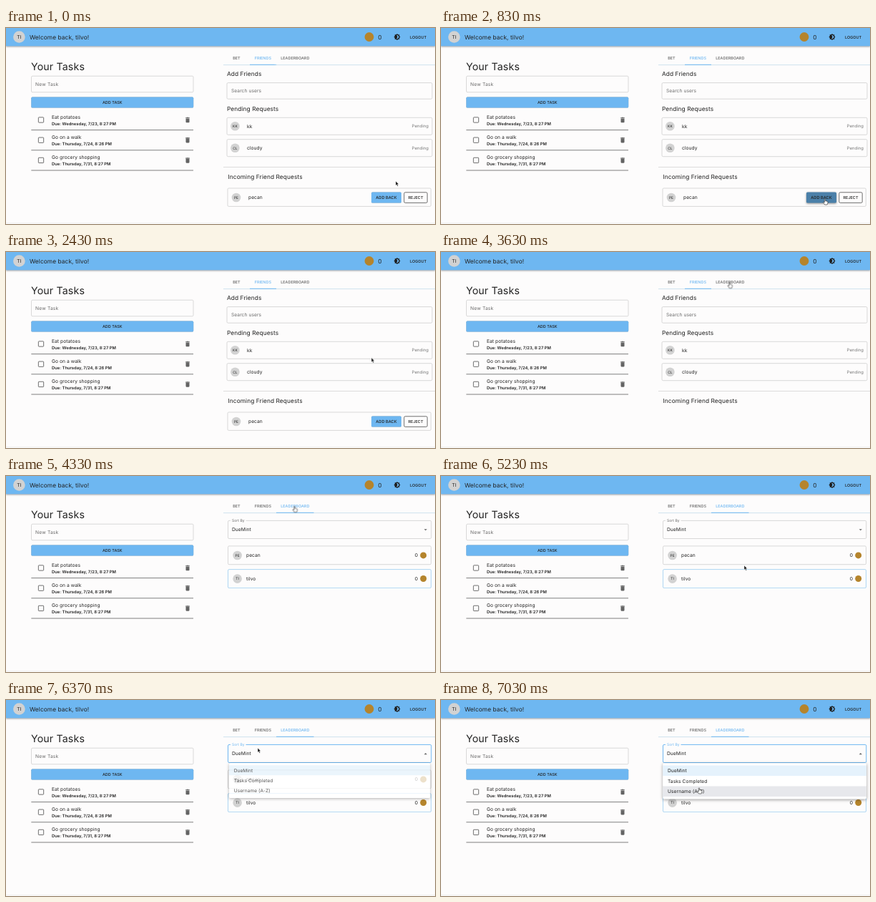
These frames come from a looping animation (600x274 px, 7070 ms). An HTML page:

```html
<!DOCTYPE html>
<html lang="en">
<head>
<meta charset="utf-8">
<title>Task dashboard</title>
<style>
:root { --blue: #6eb7f1; --ink: #222; --grey: #666; --loop: 7070ms; }
html, body { margin: 0; width: 100%; height: 100%; overflow: hidden; background: #fdfcfc; }
svg { display: block; width: 100%; height: 100%; }
text {
  font-family: Inter, "Open Sans", sans-serif; font-size: 6.67px; letter-spacing: .01em;
  fill: var(--ink); text-rendering: geometricPrecision;
}
.h4 { font-size: 14.2px; }
.h6 { font-size: 8.33px; }
.due { font-size: 5.83px; font-weight: 600; letter-spacing: 0; }
.caps { font-size: 5.5px; font-weight: 500; letter-spacing: 0; }
.mid { text-anchor: middle; }
.init { font-size: 4.9px; text-anchor: middle; letter-spacing: 0; }
.side { font-size: 5.95px; text-anchor: end; fill: #777; }
.hint { fill: #6a6a6a; }
.small { font-size: 5px; fill: var(--grey); }
.box { fill: none; stroke: #c9c9c9; stroke-width: .7; }
.rule { stroke: #4a4a4a; stroke-width: .7; }
.icon { fill: #636363; }
.avatar { fill: #d2d2d2; }
.coin { fill: #b5842c; }
.raised { fill: var(--blue); filter: drop-shadow(0 .8px .7px rgba(0,0,0,.35)); }

/* toggles and motion */
.flip, .press, .bar, .menu, .grow, .cursor { animation: var(--loop) infinite; }
.flip { animation-timing-function: step-end; }
.request { animation-name: request; }
.friends { animation-name: friends; }
.board { animation-name: board; }
.tab-a { animation-name: tabA; }
.tab-b { animation-name: tabB; }
.bar { fill: var(--blue); animation-name: bar; }
.press { animation-name: press; }
.frame { animation-name: frame; }
.label { animation-name: label; }
.closed { animation-name: closed; }
.opened { animation-name: opened; }
.menu { animation-name: fade; }
.grow { animation-name: grow; transform-origin: 452.5px 80px; }
.row1 { animation-name: row1; }
.row2 { animation-name: row2; }
.row3 { animation-name: row3; }
.cursor { animation-name: travel; }
.arrow { animation-name: arrow; }
.hand { animation-name: hand; }

@keyframes request { 0% { opacity: 1 } 38.2%, 100% { opacity: 0 } }
@keyframes friends { 0% { opacity: 1 } 54.2%, 100% { opacity: 0 } }
@keyframes board { 0% { opacity: 0 } 54.2%, 100% { opacity: 1 } }
@keyframes tabA { 0% { fill: var(--blue) } 54.2%, 100% { fill: var(--grey) } }
@keyframes tabB { 0% { fill: var(--grey) } 54.2%, 100% { fill: var(--blue) } }
@keyframes bar {
  0%, 54.2% { transform: translateX(341px) scaleX(37); animation-timing-function: cubic-bezier(.4,0,.2,1) }
  58.4%, 100% { transform: translateX(378px) scaleX(52.5) }
}
@keyframes press {
  0%, 6.3% { fill: var(--blue); filter: drop-shadow(0 .8px .7px rgba(0,0,0,.35)) }
  9.8%, 26% { fill: #4b80a9; filter: drop-shadow(0 1.2px 1.4px rgba(0,0,0,.45)) }
  29.5%, 100% { fill: var(--blue); filter: drop-shadow(0 .8px .7px rgba(0,0,0,.35)) }
}
@keyframes frame {
  0% { stroke: #c9c9c9; stroke-width: .7 }
  81.8% { stroke: #333; stroke-width: .7 }
  88.4%, 100% { stroke: var(--blue); stroke-width: 1 }
}
@keyframes label { 0% { fill: var(--grey) } 88.4%, 100% { fill: var(--blue) } }
@keyframes closed { 0% { opacity: 1 } 88.4%, 100% { opacity: 0 } }
@keyframes opened { 0% { opacity: 0 } 88.4%, 100% { opacity: 1 } }
@keyframes fade {
  0%, 88.4% { opacity: 0; animation-timing-function: cubic-bezier(.4,0,.2,1) }
  91.94%, 100% { opacity: 1 }
}
@keyframes grow {
  0%, 88.4% { transform: scale(.75, .5625); animation-timing-function: cubic-bezier(.4,0,.2,1) }
  90.76%, 100% { transform: none }
}
@keyframes row1 { 0% { fill: #e5f2fc } 94.4% { fill: #d6eafa } 95.7%, 100% { fill: #e5f2fc } }
@keyframes row2 { 0% { fill: #fff } 95.7% { fill: #e7e8ec } 97.9%, 100% { fill: #fff } }
@keyframes row3 { 0% { fill: #fff } 97.9%, 100% { fill: #e7e8ec } }
@keyframes travel {
  0%, 2% { transform: translate(545px, 214px); animation-timing-function: ease-in-out }
  9.6% { transform: translate(537px, 239px) }
  22.6% { transform: translate(537px, 239px); animation-timing-function: ease-in }
  34.4% { transform: translate(511px, 147.5px); animation-timing-function: ease-out }
  41.4% { transform: translate(412px, 48px); animation-timing-function: ease-out }
  48% { transform: translate(403.5px, 42.5px) }
  64% { transform: translate(403.5px, 42.5px); animation-timing-function: ease-in-out }
  73.9% { transform: translate(424px, 125px) }
  76% { transform: translate(424px, 125px); animation-timing-function: ease-in-out }
  86% { transform: translate(352px, 67px) }
  90.5% { transform: translate(352px, 67px); animation-timing-function: ease-in-out }
  99%, 100% { transform: translate(361px, 123px) }
}
@keyframes arrow {
  0% { opacity: 1 } 6.3% { opacity: 0 } 26% { opacity: 1 } 41% { opacity: 0 }
  65.9% { opacity: 1 } 81.8% { opacity: 0 } 88.4% { opacity: 1 } 94.4%, 100% { opacity: 0 }
}
@keyframes hand {
  0% { opacity: 0 } 6.3% { opacity: 1 } 26% { opacity: 0 } 41% { opacity: 1 }
  65.9% { opacity: 0 } 81.8% { opacity: 1 } 88.4% { opacity: 0 } 94.4%, 100% { opacity: 1 }
}
</style>
</head>
<body>
<svg viewBox="0 0 600 274" preserveAspectRatio="none">
  <defs>
    <circle id="face" class="avatar" r="6.3"/>
    <rect id="check" x="-3.65" y="-3.65" width="7.3" height="7.3" rx=".7" fill="none" stroke="#606060" stroke-width=".9"/>
    <path id="bin" class="icon" transform="scale(.417) translate(-12 -12)"
      d="M6 19c0 1.1.9 2 2 2h8c1.1 0 2-.9 2-2V7H6v12zM19 4h-3.5l-1-1h-5l-1 1H5v2h14V4z"/>
  </defs>

  <rect width="600" height="274" fill="#fdfcfc"/>
  <path d="M0 272.7H600" stroke="#ececec" stroke-width=".8"/>

  <!-- header -->
  <rect y="-4" width="600" height="29.3" fill="var(--blue)" style="filter:drop-shadow(0 1px 1.3px rgba(0,0,0,.35))"/>
  <circle class="avatar" cx="18.4" cy="12.5" r="8.3"/>
  <text class="mid" x="18.4" y="14.9">TI</text>
  <text class="h6" x="33" y="15.5">Welcome back, tilvo!</text>
  <circle class="coin" cx="508" cy="12.5" r="6.4"/>
  <text class="h6" x="520.3" y="15.6">0</text>
  <path fill="#1d1d1d" transform="translate(547 12.5) scale(.4) translate(-12 -12)"
    d="M20 8.69V4h-4.69L12 .69 8.69 4H4v4.69L.69 12 4 15.31V20h4.69L12 23.31 15.31 20H20v-4.69L23.31 12 20 8.69zM12 18c-.89 0-1.74-.2-2.5-.55C11.56 16.5 13 14.42 13 12s-1.44-4.5-3.5-5.45C10.26 6.2 11.11 6 12 6c3.31 0 6 2.69 6 6s-2.69 6-6 6z"/>
  <text class="caps" x="565" y="14.6">LOGOUT</text>

  <!-- tasks -->
  <text class="h4" x="35" y="58.7">Your Tasks</text>
  <rect class="box" x="35.5" y="67.2" width="226.5" height="22.6" rx="1.6"/>
  <text class="hint" x="41" y="80.8" style="letter-spacing:.03em">New Task</text>
  <rect class="raised" x="35.3" y="96.6" width="226.9" height="15" rx="1.6"/>
  <text class="caps mid" x="148.8" y="106.1">ADD TASK</text>
  <g>
    <use href="#check" x="49" y="128.5"/><use href="#bin" x="254" y="128.5"/>
    <text x="64" y="127.1">Eat potatoes</text>
    <text class="due" x="64" y="135.6">Due: Wednesday, 7/23, 8:27 PM</text>
    <path class="rule" d="M35.3 142.6H262"/>
  </g>
  <g transform="translate(0 28.2)">
    <use href="#check" x="49" y="128.5"/><use href="#bin" x="254" y="128.5"/>
    <text x="64" y="127.1">Go on a walk</text>
    <text class="due" x="64" y="135.6">Due: Thursday, 7/24, 8:26 PM</text>
    <path class="rule" d="M35.3 142.6H262"/>
  </g>
  <g transform="translate(0 56.4)">
    <use href="#check" x="49" y="128.5"/><use href="#bin" x="254" y="128.5"/>
    <text x="64" y="127.1">Go grocery shopping</text>
    <text class="due" x="64" y="135.6">Due: Thursday, 7/31, 8:27 PM</text>
    <path class="rule" d="M35.3 142.6H262"/>
  </g>

  <!-- tabs -->
  <path d="M304 51.6H600" stroke="#bcd8ea" stroke-width=".7"/>
  <text class="caps mid" x="322.4" y="43.8" style="fill:var(--grey)">BET</text>
  <text class="caps mid flip tab-a" x="359.4" y="43.8">FRIENDS</text>
  <text class="caps mid flip tab-b" x="404.3" y="43.8">LEADERBOARD</text>
  <rect class="bar" y="50.8" width="1" height="1"/>

  <!-- friends -->
  <g class="flip friends">
    <text class="h6" x="309" y="66.5">Add Friends</text>
    <rect class="box" x="309" y="76.6" width="287" height="22.6" rx="1.6"/>
    <text class="hint" x="315" y="90.2">Search users</text>
    <text class="h6" x="309" y="115.6">Pending Requests</text>
    <rect class="box" x="309" y="125.3" width="287" height="24" rx="1.6"/>
    <use href="#face" x="320.4" y="137.3"/>
    <text class="init" x="320.4" y="139.1">KK</text>
    <text x="337" y="139.7">kk</text>
    <text class="side" x="591" y="139.4">Pending</text>
    <rect class="box" x="309" y="155.7" width="287" height="24" rx="1.6"/>
    <use href="#face" x="320.4" y="167.7"/>
    <text class="init" x="320.4" y="169.5">CL</text>
    <text x="337" y="170.1">cloudy</text>
    <text class="side" x="591" y="169.8">Pending</text>
    <path d="M304 194.5H600" stroke="#cfcfcf" stroke-width=".7"/>
    <text class="h6" x="310.5" y="210.7">Incoming Friend Requests</text>
    <g class="flip request">
      <rect class="box" x="310" y="224" width="284.3" height="25.4" rx="1.6"/>
      <use href="#face" x="322" y="237"/>
      <text class="init" x="322" y="238.8">PE</text>
      <text x="339" y="239.3">pecan</text>
      <rect class="press" x="511" y="229.6" width="42" height="15" rx="1.6"/>
      <text class="caps mid" x="532" y="239.1" style="font-size:5.7px">ADD BACK</text>
      <rect x="556.8" y="229.8" width="32.4" height="14.6" rx="1.6" fill="none" stroke="#333" stroke-width=".7"/>
      <text class="caps mid" x="573" y="239.1">REJECT</text>
    </g>
  </g>

  <!-- leaderboard -->
  <g class="flip board">
    <path class="box flip frame" d="M314 62.4H312.1a1.6 1.6 0 0 0-1.6 1.6V85.9a1.6 1.6 0 0 0 1.6 1.6H593.2a1.6 1.6 0 0 0 1.6-1.6V64a1.6 1.6 0 0 0-1.6-1.6H335.5"/>
    <text class="small flip label" x="316" y="63.6">Sort By</text>
    <text x="316" y="77.4">DueMint</text>
    <path class="icon flip closed" d="M584.7 74.2h4.2l-2.1 2.1z"/>
    <path class="icon flip opened" d="M584.7 76.2h4.2l-2.1-2.1z"/>
    <rect class="box" x="310.5" y="97.9" width="284" height="25.8" rx="1.6"/>
    <use href="#face" x="323.6" y="111"/>
    <text class="init" x="323.6" y="112.8">PE</text>
    <text x="336" y="113.4">pecan</text>
    <text x="571.8" y="113.4">0</text>
    <circle class="coin" cx="583.7" cy="110.9" r="4.5"/>
    <rect class="box" x="310.5" y="130.6" width="284" height="26" rx="1.6" style="stroke:#8cc6f0"/>
    <use href="#face" x="323.6" y="143.6"/>
    <text class="init" x="323.6" y="145.4">TI</text>
    <text x="336" y="146">tilvo</text>
    <text x="571.8" y="146">0</text>
    <circle class="coin" cx="583.7" cy="143.5" r="4.5"/>
  </g>

  <!-- sort menu -->
  <g class="menu"><g class="grow">
    <rect x="310.3" y="88.2" width="284.6" height="50.2" rx="1.6" fill="#fff" style="filter:drop-shadow(0 1.8px 2px rgba(0,0,0,.4))"/>
    <rect class="flip row1" x="310.3" y="91.5" width="284.6" height="14.5"/>
    <rect class="flip row2" x="310.3" y="106" width="284.6" height="14.5"/>
    <rect class="flip row3" x="310.3" y="120.5" width="284.6" height="14.5"/>
    <text x="317" y="101.2">DueMint</text>
    <text x="317" y="115.8">Tasks Completed</text>
    <text x="317" y="130.3">Username (A-Z)</text>
  </g></g>

  <g class="cursor">
    <path class="flip arrow" d="M0 0V6.2L1.4 5L2.4 7.3L3.5 6.8L2.5 4.6H4.4Z" fill="#111" stroke="#fff" stroke-width=".5"/>
    <path class="flip hand" d="M-.7.6Q-.7-.2 0-.2T.7.6V3Q1.4 2.5 1.9 3.2Q2.5 2.8 3 3.5Q4 3.2 4 4.4Q4 6.4 3.1 8H-.4Q-1.2 6.4-2.3 5.1Q-2.5 4-1.5 4.3L-.7 5Z" fill="#fff" stroke="#222" stroke-width=".6"/>
  </g>
</svg>
</body>
</html>
```
